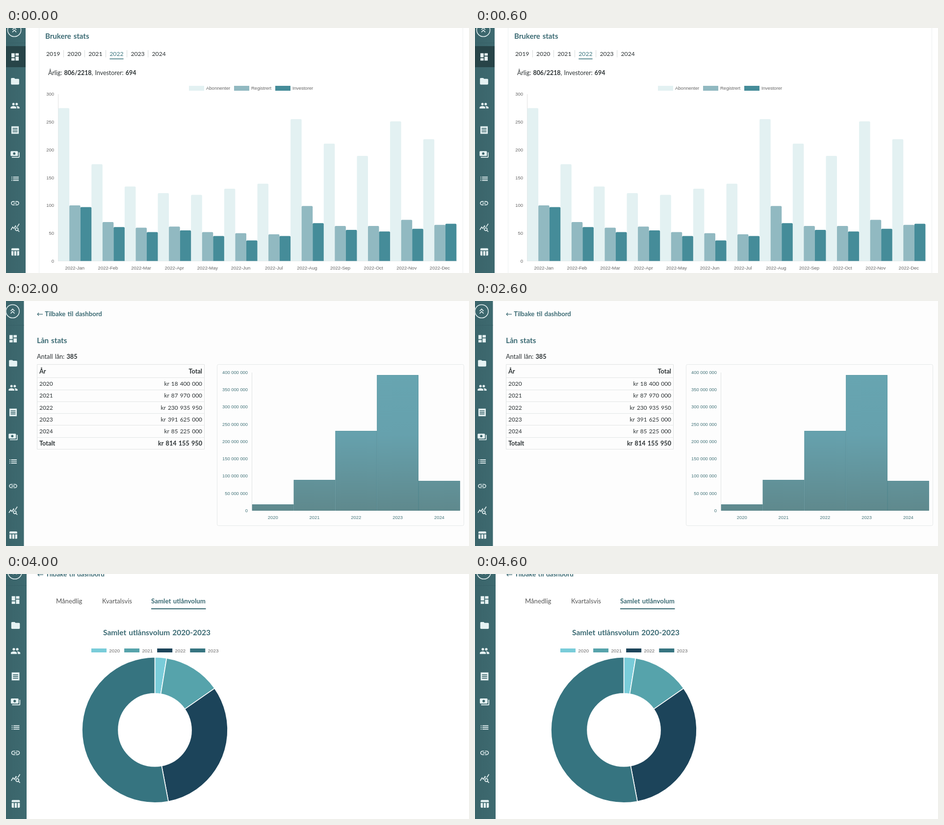
Write an HTML page with a canvas that moves like this. It is 944 by 500 pixels and loops after 5000 ms.

```html
<!DOCTYPE html>
<html lang="no">
<head>
<meta charset="utf-8">
<title>Dashbord</title>
<style>
html, body { margin: 0; width: 100%; height: 100%; overflow: hidden; background: #fff; }
canvas { display: block; }
</style>
</head>
<body>
<canvas id="stage" width="944" height="500"></canvas>
<script>
const ctx = document.getElementById('stage').getContext('2d');
const UI = 'Lato, "Open Sans", sans-serif';
const CHART = '"Liberation Sans", Arial, sans-serif';
const INK = '#2b3133', TEAL = '#3b6a73', ACCENT = '#458c99', TINT = '#f5fafb', RULE = '#dde5e6';
const MONTHS = 'Jan Feb Mar Apr May Jun Jul Aug Sep Oct Nov Dec'.split(' ');

// 24 x 24 sidebar icons, top to bottom
const ICONS = [
  'M3 13h8V3H3zm0 8h8v-6H3zm10 0h8V11h-8zm0-18v6h8V3z',
  'M10 4H4c-1.1 0-2 .9-2 2v12c0 1.1.9 2 2 2h16c1.1 0 2-.9 2-2V8c0-1.1-.9-2-2-2h-8z',
  'M16 11a3 3 0 1 0 0-6 3 3 0 0 0 0 6zM8 11a3 3 0 1 0 0-6 3 3 0 0 0 0 6zm0 2c-2.33 0-7 1.17-7 3.5V19h14v-2.5c0-2.33-4.67-3.5-7-3.5zm8 0-.97.05c1.16.84 1.97 1.97 1.97 3.45V19h6v-2.5c0-2.33-4.67-3.5-7-3.5z',
  'M18 17H6v-2h12zm0-4H6v-2h12zm0-4H6V7h12zM3 22l1.5-1.5L6 22l1.5-1.5L9 22l1.5-1.5L12 22l1.5-1.5L15 22l1.5-1.5L18 22l1.5-1.5L21 22V2l-1.5 1.5L18 2l-1.5 1.5L15 2l-1.5 1.5L12 2l-1.5 1.5L9 2 7.5 3.5 6 2 4.5 3.5 3 2z',
  'M19 14V6c0-1.1-.9-2-2-2H3c-1.1 0-2 .9-2 2v8c0 1.1.9 2 2 2h14c1.1 0 2-.9 2-2zm-9-1a3 3 0 1 1 0-6 3 3 0 0 1 0 6zm13-6v11c0 1.1-.9 2-2 2H4v-2h17V7z',
  'M3 13h2v-2H3zm0 4h2v-2H3zm0-8h2V7H3zm4 4h14v-2H7zm0 4h14v-2H7zM7 7v2h14V7z',
  'M3.9 12c0-1.7 1.4-3.1 3.1-3.1h4V7H7a5 5 0 0 0 0 10h4v-1.9H7A3.1 3.1 0 0 1 3.9 12zM8 13h8v-2H8zm9-6h-4v1.9h4a3.1 3.1 0 0 1 0 6.2h-4V17h4a5 5 0 0 0 0-10z',
  'M19.9 18.5a4.5 4.5 0 1 0-1.4 1.4l3.1 3.1 1.4-1.4zm-3.8.1a2.5 2.5 0 1 1 0-5 2.5 2.5 0 0 1 0 5zm-.4-8.5c-.7 0-1.4.2-2.1.4l-.5-.8-3.8 6.2-3-3.5-3.7 5.8L1 17l5-8 3 3.5L13 6zm2.6.5c-.6-.3-1.3-.5-2-.5L21.4 2 23 3.2z',
  'M10 10h5v11h-5zm7 11h3c1.1 0 2-.9 2-2v-9h-5zm3-18H5c-1.1 0-2 .9-2 2v3h19V5c0-1.1-.9-2-2-2zM3 19c0 1.1.9 2 2 2h3V10H3z'
].map(d => new Path2D(d));

function rect(x, y, w, h, fill) {
  ctx.fillStyle = fill;
  ctx.fillRect(x, y, w, h);
}

function box(x, y, w, h, r, stroke, fill) {
  ctx.beginPath();
  ctx.roundRect(x, y, w, h, r);
  if (fill) { ctx.fillStyle = fill; ctx.fill(); }
  if (stroke) { ctx.strokeStyle = stroke; ctx.lineWidth = 1; ctx.stroke(); }
}

function line(points, stroke, width = 1) {
  ctx.beginPath();
  for (let i = 0; i < points.length; i += 2) ctx.lineTo(points[i], points[i + 1]);
  ctx.strokeStyle = stroke;
  ctx.lineWidth = width;
  ctx.stroke();
}

function ring(x, y, r, stroke, width) {
  ctx.beginPath();
  ctx.arc(x, y, r, 0, 7);
  ctx.strokeStyle = stroke;
  ctx.lineWidth = width;
  ctx.stroke();
}

function icon(i, cx, cy, size, fill) {
  ctx.save();
  ctx.translate(cx - size / 2, cy - size / 2);
  ctx.scale(size / 24, size / 24);
  ctx.fillStyle = fill;
  ctx.fill(ICONS[i], 'evenodd');
  ctx.restore();
}

// y is the middle of the capitals
function text(str, x, y, size, color = INK, { bold, align = 'left', font = UI } = {}) {
  ctx.font = `${bold ? 'bold ' : ''}${size}px ${font}`;
  ctx.wordSpacing = font === UI ? size * .08 + 'px' : '0px';
  ctx.textAlign = align;
  ctx.fillStyle = color;
  ctx.fillText(str, x, y + size * .36);
  return ctx.measureText(str).width;
}

// asterisks switch bold on and off
function rich(str, x, y, size) {
  str.split('*').forEach((part, i) => x += text(part, x, y, size, INK, { bold: i % 2 }));
}

const bold = (str, x, y, size, color = TEAL, align) => text(str, x, y, size, color, { bold: true, align });
const label = (str, x, y, size, align, color = '#666') => text(str, x, y, size, color, { align, font: CHART });

function sidebar(w, cx, top, pitch, size, active, ringX, ringY, rule) {
  const g = ctx.createLinearGradient(0, 0, w, 0);
  g.addColorStop(0, '#3a646a');
  g.addColorStop(1, '#3e6a70');
  rect(0, 0, w, 500, g);
  if (active) rect(0, active[0], w, active[1] - active[0], '#274448');
  ICONS.forEach((_, i) => icon(i, cx, top + pitch * i, size, '#e6f2f3'));
  if (!rule) return;
  line([0, rule, w, rule], '#376067');
  ring(ringX, ringY, size * .68, '#e6f2f3', 1.5);
  for (const y of [ringY - .5, ringY + 4.5])
    line([ringX - 4, y, ringX, y - 4, ringX + 4, y], '#e6f2f3', 1.6);
}

function years(first, x, y, step, size, current) {
  for (let i = 0; i < 6 && first + i < 2025; i++) {
    const on = first + i === current, left = x + step * i;
    const w = text(first + i, left, y, size, on ? '#39747d' : INK);
    if (on) rect(left, y + size * .8, w, 1.5, '#39747d');
    if (first + i < 2024) line([left + step * .82, y - size * .6, left + step * .82, y + size * .6], '#d5d9d9');
  }
}

function pillTabs(x, y, w, h, seps, active, size, starts) {
  box(x, y, w, h, h / 2, '#e3ebec', '#fff');
  const edges = [x, ...seps, x + w], r = h / 2;
  box(edges[active], y, edges[active + 1] - edges[active], h, active ? [0, r, r, 0] : [r, 0, 0, r], null, '#d8ebed');
  seps.forEach(s => line([s, y, s, y + h], '#e3ebec'));
  ['LÅN STATUS', 'FØLG OPP', 'AML/PEP', 'STATS'].forEach((s, i) =>
    text(s, starts[i], y + h / 2, size, i === active ? '#4a828a' : '#444'));
}

function backLink(x, y, size) {
  line([x + 12, y + 1, x + 1, y + 1], TEAL, 1.2);
  line([x + 4, y - 2, x + 1, y + 1, x + 4, y + 4], TEAL, 1.2);
  bold('Tilbake til dashbord', x + size * 1.24, y, size);
}

function userStats() {
  line([67.5, 0, 67.5, 500], '#edf0f0');
  line([931.5, 0, 931.5, 500], '#edf0f0');
  bold('Brukere stats', 80, 17, 15);
  years(2019, 82, 52.5, 43.1, 12.2, 2022);
  rich('Årlig: *806/2218*, Investorer: *694*', 86, 91.5, 12.4);

  const series = [
    ['Abonnenter', '#e3f1f2', 373, [275, 174, 134, 122, 119, 130, 139, 255, 211, 189, 251, 219]],
    ['Registrert', '#91b9c1', 465, [100, 70, 60, 62, 52, 50, 48, 99, 63, 63, 74, 65]],
    ['Investorer', ACCENT, 549, [97, 61, 52, 55, 45, 37, 45, 68, 56, 53, 58, 67]]
  ];
  for (let v = 0; v <= 300; v += 50) label(v, 98, 475.5 - v * 1.135, 9.4, 'right');
  line([106.5, 135, 106.5, 476], '#e2e2e2');
  line([106, 475.5, 919, 475.5], '#e2e2e2');
  series.forEach(([name, color, x, values], s) => {
    rect(x, 118, 31, 10, color);
    label(name, x + 35, 123, 9.5);
    values.forEach((v, i) =>
      box(106.6 + 67.65 * i + 22.55 * s, 475.5 - v * 1.135, 22.55, v * 1.135, [2, 2, 0, 0], null, color));
  });
  MONTHS.forEach((m, i) => label('2022-' + m, 140.3 + 67.65 * i, 490, 9.5, 'center'));
  sidebar(40, 18.5, 59, 49.75, 20, [37, 80], 17, 4, 30.5);
}

function loanStats() {
  const totals = [46350, 37500, 14640, 35950, 32775, 22350, 18750, 51800, 22730, 62750, 17600, 28430];
  const fees = ['1 815 200', '1 648 750', '568 500', '1 444 500', '1 348 312,5', '1 111 875',
    '746 625', '2 573 590', '1 409 150', '3 040 000', '1 035 500', '1 256 500'];
  pillTabs(56.5, 13, 219.5, 17.5, [122.5, 182.5, 235.5], 3, 8.6, [65, 131, 191, 244]);
  box(56.5, 46.5, 430, 60, 4, '#eef2f2');
  box(501.5, 46.5, 431, 60, 4, '#eef2f2');
  box(56.5, 126.5, 876, 400, 4, '#eef2f2');
  [['385', 111, 'Antall lån', 97], ['814 MNOK', 245, 'Totalt utlån', 226], ['12,5 %', 405, 'Gj.sn.vektet rente', 372],
    ['6 866', 572, 'Abonnenter', 551], ['3 112', 721, 'Fullt registrert', 702], ['1 937', 867, 'Investorer', 851]]
    .forEach(([value, cx, name, x]) => {
      bold(value, cx, 66, 13.3, TEAL, 'center');
      text(name, x, 89, 10.6, '#666');
    });
  for (const y of [86, 88.3, 90.6]) {
    rect(84, y, 2, 1.8, ACCENT);
    rect(86.5, y, 6, 1.8, ACCENT);
  }
  bold('Σ', 218, 89, 11, ACCENT, 'center');
  bold('%', 363, 90, 10.5, ACCENT, 'center');
  icon(2, 543, 90, 12, ACCENT);
  icon(2, 682, 90, 12, ACCENT);
  line([689, 90, 692, 93, 698, 87], ACCENT, 1.3);
  box(837.5, 86.5, 9, 7, 0, ACCENT);
  rect(839, 88, 6, 2.5, ACCENT);
  rect(839, 91.3, 6, 1, ACCENT);

  bold('Lån stats', 67, 146, 12.2);
  years(2020, 68.3, 175, 35.2, 10, 2023);
  const row = (cells, y, size, heavy) =>
    cells.forEach((c, i) => text(c, [70, 111, 166][i], y, size, INK, { bold: heavy }));
  row(['Måneder', 'Total', 'Etabgebyr'], 214, 8.3, true);
  MONTHS.forEach((m, i) => {
    const t = totals[i];
    row([m, `${Math.floor(t / 1000)} ${String(t % 1000).padStart(3, 0)} 000`, fees[i]], 231.5 + 16.53 * i, 8);
  });
  row(['Totalt', '391 625 000', '17 998 502,5'], 430, 8.4, true);

  for (let v = 0; v <= 70; v += 10) label(v + ' MNOK', 297, 502.2 - v * 4.167, 7.6, 'right');
  line([304, 210, 304, 500], '#e2e2e2');
  totals.forEach((t, i) => {
    const mix = (a, b) => Math.round(a + (b - a) * i / 11);
    const h = t * .004167, x = 304 + 48.73 * i;
    rect(x, 502.2 - h, 48.73, h, `rgb(${mix(171, 68)},${mix(202, 140)},${mix(207, 153)})`);
    line([x + .5, 502, x + .5, 502.7 - h, x + 48.2, 502.7 - h, x + 48.2, 502], 'rgba(60,130,145,.28)');
  });
  sidebar(34, 17, 18.5, 40.45, 16.5, [0, 36]);
}

function yearTotals() {
  rect(0, 0, 944, 500, '#fdfdfd');
  backLink(63, 26, 13.1);
  bold('Lån stats', 63, 80.5, 15.2);
  rich('Antall lån: *385*', 63, 113.5, 12.7);
  box(63.5, 129.5, 341, 173, 0, '#e0e3e3', '#fdfdfd');
  [['År', 'Total'], ['2020', 'kr 18 400 000'], ['2021', 'kr 87 970 000'], ['2022', 'kr 230 935 950'],
    ['2023', 'kr 391 625 000'], ['2024', 'kr 85 225 000'], ['Totalt', 'kr 814 155 950']]
    .forEach(([year, sum], i) => {
      const y = i ? 144.7 + 24.25 * i : 143, heavy = i % 6 === 0;
      const size = heavy ? 12.7 : 11.9;
      text(year, 68, y, size, INK, { bold: heavy });
      text(sum, 400, y, size, INK, { bold: heavy, align: 'right' });
      if (i) line([64, Math.round(y - 12.5) + .5, 404, Math.round(y - 12.5) + .5], '#e3e6e6');
    });

  box(430.5, 129.5, 503, 329, 3, '#e5e9e9', '#fdfdfd');
  for (let v = 0; v <= 400; v += 50)
    label(v ? v + ' 000 000' : '0', 493, 427.5 - v * .705, 9.35, 'right', '#44747a');
  line([501.5, 146, 501.5, 428], '#e0e4e4');
  const g = ctx.createLinearGradient(0, 146, 0, 428);
  g.addColorStop(0, '#67a5b1');
  g.addColorStop(.45, '#66a1ad');
  g.addColorStop(1, '#5f898d');
  [18.4, 87.97, 230.94, 391.63, 85.23].forEach((v, i) => {
    const x = 501.8 + 84.8 * i, y = Math.round(427.5 - v * .705);
    rect(x, y, 84.8, 428 - y, g);
    line([x + .5, 427.5, x + .5, y + .5, x + 84.3, y + .5, x + 84.3, 427.5], 'rgba(65,125,135,.3)');
    label(2020 + i, x + 42.4, 441.5, 9.4, 'center', '#44747a');
  });
  sidebar(36.5, 14.5, 77, 50.1, 20, null, 13.5, 21, 49.5);
}

function tag(str, x, y, w) {
  box(x + .5, y - 8.5, w, 17, 8.5, '#79a3ac', '#fbfdfd');
  text(str, x + 5, y, 9.3, '#35535a');
}

function loan(name, amount, x, mid, note, noteX) {
  text(name, x, mid - 8, 11.1);
  text(amount + ' MNOK', x, mid + 8, 10.5);
  if (note) text(note, noteX, mid + 8, 10.8);
}

function tableRow(x, w, top, bottom, white) {
  if (white) rect(x, top, w, bottom - top, '#fff');
  line([x, Math.round(bottom) - .5, x + w, Math.round(bottom) - .5], RULE);
}

function loanStatus() {
  pillTabs(64.5, -5, 264.5, 20.5, [145.5, 216.5, 280.5], 0, 10.3, [75, 155, 227, 290.5]);
  [[64.5, 280], [353, 288.5], [650, 283.5]].forEach(([x, w]) => box(x, 34, w, 480, 3, null, TINT));
  bold('Lån til forfall (100)', 82, 54.5, 15.8);
  bold('Nye lån/Faser', 370, 53, 15.2);
  bold('Aktive', 667, 53, 15);

  tableRow(72.5, 264.5, 79, 103, true);
  text('Lånetaker', 85, 90.5, 9.9, '#555');
  bold('Dager', 272, 90.5, 9.5, INK);
  line([305, 96, 305, 87], INK, 1.4);
  line([301, 91, 305, 87, 309, 91], INK, 1.4);
  const home = 'Lunvik Boligutv..', cabin = 'Nerk Hytte AS..', plot = 'Kapital og tomt..', yard = 'Tunet Kvalro AS..';
  [[home, '2,00', 'Jan 31', 1], [home, '2,00', 'Jan 31', 1], [cabin, '7,00', 'Jan 31', 1],
    [plot, '1,60', 'Feb 2', 3], ['T. Hylv Utbygge..', '1,50', 'Feb 2', 3], [cabin, '1,50', 'Feb 3', 4],
    [cabin, '1,50', 'Feb 3', 4], [yard, '2,00', 'Feb 3', 4], [yard, '1,50', 'Feb 3', 4],
    [yard, '2,50', 'Feb 3', 4], ['Brøskelunden 4..', '1,50', 'Feb 3', 4]]
    .forEach(([name, amount, date, days], i) => {
      const mid = i ? 154.7 + 38.62 * (i - 1) : 119;
      tableRow(72.5, 264.5, i ? mid - 19.3 : 103, i ? mid + 19.3 : 136, i % 2 === 0);
      loan(name, amount, 85, mid, date, 151);
      ring(291.5, mid, 9.2, '#c3a08c', 2.2);
      ring(291.5, mid, 7.6, '#8d8078', .8);
      text(days, 291.5, mid, 10.5, INK, { align: 'center' });
    });

  for (const [x, w, tagX] of [[361, 273, 502], [658, 266, 778]]) {
    tableRow(x, w, 77, 101, true);
    text('Låntaker', x + 12, 88, 9.9, '#555');
    text('Merkelapper', tagX, 88, 9.9, '#555');
  }
  const farm = 'Drøv Utleige AS..', bay = 'Ospvik AS..';
  ['Flisvang AS..', 'Fin Tomte AS..', farm, farm, plot, plot, bay, bay, bay, bay, bay].forEach((name, i) => {
    const mid = 120 + 38.65 * i;
    tableRow(361, 273, mid - 19, mid + 19.6, i % 2 === 0);
    loan(name, i ? '0,50' : '5,25', 373.5, mid);
    tag(i ? 'Kommende ny fase..' : 'Kommende refinansi..', 502, mid, i ? 92 : 97.5);
  });

  tableRow(658, 266, 101, 140, true);
  loan(bay, '0,50', 670, 120);
  ring(744.5, 127.5, 8.6, '#69a9b0', 1.6);
  ring(744.5, 127.5, 7.2, '#8fb3b7', .7);
  text('63', 744.5, 127.5, 9.8, '#44747a', { align: 'center' });
  tag('Dagens lån..', 778, 120, 59);
  loan('Trinnolds Vei 7..', '9,50', 670, 169.5, 'Fullt', 736);
  tag('Dagens lån..', 778, 158, 59);
  tag('Mangler dokumenter..', 778, 182, 99);
  sidebar(38.5, 17.5, 1.7, 48.55, 19.5, [0, 22]);
}

function volume() {
  backLink(64, .5, 13.5);
  text('Månedlig', 102, 55.5, 13.2, '#555');
  text('Kvartalsvis', 196, 55.5, 13, '#555');
  bold('Samlet utlånvolum', 296, 55.5, 13.3);
  rect(296, 70, 111.5, 2, TEAL);
  bold('Samlet utlånsvolum 2020-2023', 307.5, 119, 15.5, TEAL, 'center');

  const colors = ['#79ccd9', '#56a3ab', '#1c445a', '#367480'];
  const degrees = [0, 9.3, 55.1, 169.3, 360];
  const angle = i => (degrees[i] - 90) * Math.PI / 180;
  colors.forEach((color, i) => {
    rect(174 + 67.1 * i, 152, 31, 8, color);
    label(2020 + i, 210.3 + 67.1 * i, 156, 9.8);
    ctx.beginPath();
    ctx.arc(303.5, 318.3, 148.5, angle(i), angle(i + 1));
    ctx.arc(303.5, 318.3, 74.5, angle(i + 1), angle(i), true);
    ctx.closePath();
    ctx.fillStyle = color;
    ctx.fill();
    ctx.strokeStyle = '#fff';
    ctx.lineWidth = 1.6;
    ctx.stroke();
  });
  sidebar(42, 19.5, 53, 52, 21, null, 18, -4, 23.5);
}

const scenes = [userStats, loanStats, yearTotals, loanStatus, volume];

function draw() {
  rect(0, 0, 944, 500, '#fff');
  scenes[Math.floor(performance.now() / 1000) % scenes.length]();
  requestAnimationFrame(draw);
}
draw();
</script>
</body>
</html>
```
